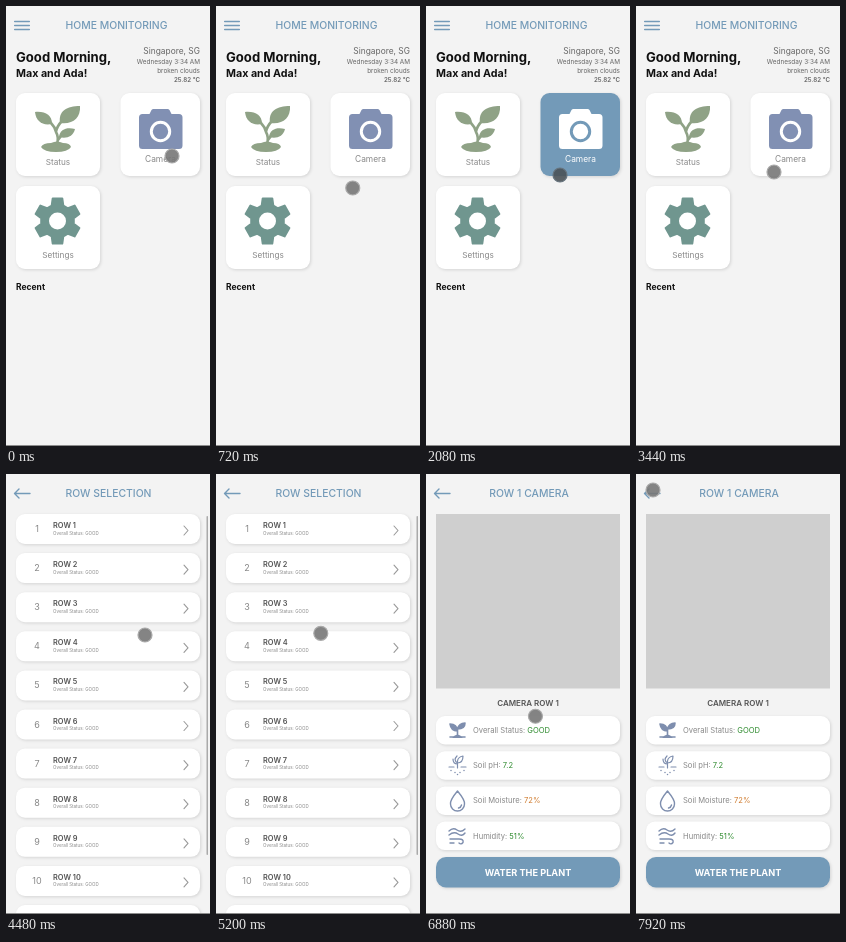
Animation, 204 px wide and 440 px high, one loop 8000 ms. Source, as an HTML page:

```html
<!DOCTYPE html>
<html lang="en">
<head>
<meta charset="utf-8">
<style>
html, body { margin: 0; width: 100%; height: 100%; overflow: hidden; background: #f3f3f3; }
svg { display: block; width: 204px; height: 440px; font-family: Inter, "Open Sans", sans-serif; }
.card { fill: #fff; filter: drop-shadow(1px 1.5px 1.5px #00000020); }
.line { fill: none; stroke-linecap: round; stroke-linejoin: round; }
#camera { --card: #fff; --icon: #8190b3; --label: #888; }
#camera.hot { --card: #739ab8; --icon: #fff; --label: #fff; }
#camera .card { fill: var(--card); }
</style>
</head>
<body>
<svg id="stage" viewBox="0 0 204 440"></svg>
<script>
const LOOP = 8000, BLUE = '#739ab8', SLATE = '#7e8eae', LEAF = '#8fa286', TEAL = '#70968f';

const text = (x, y, size, str, fill, weight = 400, anchor = 'start') =>
  `<text x="${x}" y="${y}" font-size="${size}" fill="${fill}" font-weight="${weight}" text-anchor="${anchor}">${str}</text>`;
const mid = (x, y, size, str, fill, weight) => text(x, y, size, str, fill, weight, 'middle');
const right = (y, size, str, weight) => text(194, y, size, str, '#666', weight, 'end');
const card = (x, y, w, h, r = 9) => `<rect class="card" x="${x}" y="${y}" width="${w}" height="${h}" rx="${r}"/>`;
const line = (d, stroke, width) => `<path class="line" d="${d}" stroke="${stroke}" stroke-width="${width}"/>`;
const list = (n, fn) => Array.from({ length: n }, (_, i) => fn(i)).join('');
const title = (x, str) => mid(x, 23.3, 10.4, str, BLUE, 500);
const back = line('M24 19.5H8.5M13 15L8.5 19.5L13 24', BLUE, 1.4);

const plant = `<g fill="${LEAF}">
  <path d="M54 117C52 105 61 100 74 100C75 112 66 119 54 117Z"/>
  <path d="M46 118C36 120 30 115 29 106C39 105 46 109 46 118Z"/>
  <path d="M53 131C54 123 61 121 69 123C67 131 60 133 53 131Z"/>
  <path d="M35 141Q37 137 45 137Q51 134 57 137Q64 137 65 141Q62 146 50 146Q38 146 35 141Z"/></g>` +
  line('M51 138Q53 131 50 126Q49 121 45 117M50 126Q51 120 56 115M52 134L55 130', LEAF, 2.6);

function gear(cx, cy) {
  const at = (r, a) => `${cx + r * Math.sin(a)},${cy - r * Math.cos(a)}`;
  const points = list(6, i => [[16.5, -.36], [23, -.21], [23, .21], [16.5, .36]]
    .map(([r, a]) => at(r, i * Math.PI / 3 + a)).join(' ') + ' ');
  return `<polygon points="${points}" fill="${TEAL}" stroke="${TEAL}" stroke-width="2" stroke-linejoin="round"/>
    <circle cx="${cx}" cy="${cy}" r="8.5" fill="#fff"/>`;
}

const home = title(110.5, 'HOME MONITORING') +
  line('M8.700 15.500H23.300M8.700 19.500H23.300M8.700 23.500H23.300', BLUE, 1.5) +
  text(10, 56, 13.1, 'Good Morning,', '#111', 700) +
  text(10, 71, 10.7, 'Max and Ada!', '#111', 700) +
  right(48, 8.4, 'Singapore, SG') + right(58, 6.4, 'Wednesday 3:34 AM') +
  right(67, 6.4, 'broken clouds') + right(75.5, 6.2, '25.82 °C', 600) +
  card(10, 87, 84, 83) + plant + mid(52, 159, 8.2, 'Status', '#888') +
  `<g id="camera">${card(114.5, 87, 79.5, 83)}
    <path fill="var(--icon)" d="M136.500 108H143.500L145.500 104Q146.200 103 147.500 103H161.500Q162.800 103 163.500 104L165.500 108H173Q176.500 108 176.500 111.500V139.500Q176.500 143 173 143H136.500Q133 143 133 139.500V111.500Q133 108 136.500 108Z"/>
    <circle cx="154.500" cy="125.500" r="9.200" fill="none" stroke="var(--card)" stroke-width="3"/>
    ${mid(154.5, 156, 8.4, 'Camera', 'var(--label)')}</g>` +
  card(10, 180, 84, 83) + gear(51.5, 215) + mid(52, 251.5, 8.2, 'Settings', '#888') +
  text(10, 284, 8.5, 'Recent', '#111', 700);

const rows = title(102.5, 'ROW SELECTION') + back +
  list(11, i => `<g transform="translate(0 ${i * 39.1})">` + card(10, 40, 184, 30) +
    mid(31, 58, 9, i + 1, '#888') + text(47, 54, 7.4, 'ROW ' + (i + 1), '#555', 600) +
    text(47, 60.5, 4.5, 'Overall Status: GOOD', '#888') +
    line('M178 52L182 56.500L178 61', '#999', 1.1) + '</g>') +
  '<rect x="200.500" y="42" width="1.500" height="339" rx=".7" fill="#aaa"/>';

const icons = [
  line('M24 263H39M31.5 262V254M31.5 257Q25 257 24 250Q31 250 31.500 257M31.500 255Q33 249 39 249Q39 255 31.500 255', SLATE, 1.6) +
    `<path d="M24 250Q31 250 31.500 257Q25 257 24 250M39 249Q33 249 31.500 255Q39 255 39 249M26 264Q31.500 257 37 264Z" fill="${SLATE}"/>`,
  line('M23 293H28M35 293H40M31.500 294V287M31.500 290Q27 290 27 285M31.500 287Q32 283 37 282Q37 289 31.500 289Q27 286 31 282', SLATE, 1.2) +
    line('M25 296.500h0M29 298.500h0M34 298.500h0M38 296.500h0M31.500 300.500h0', SLATE, 1.5),
  line('M31.500 317Q24 326 24.500 330A7 7 0 0 0 38.500 330Q39 326 31.500 317ZM35.500 331Q35 333.500 32.500 334', SLATE, 1.4),
  line('M23 357Q27 353 31 356T39 355M23 361Q28 357 32 360T39 359M24 365H33Q38 365 37 368.500Q35 371 33 369M24 369H28', SLATE, 1.4)
];
const readings = [
  ['Overall Status', 'GOOD', '#2e8b2e'], ['Soil pH', '7.2', '#2e8b2e'],
  ['Soil Moisture', '72%', '#cf7a2c'], ['Humidity', '51%', '#2e8b2e']
];
const detail = title(103, 'ROW 1 CAMERA') + back +
  '<rect x="10" y="40" width="184" height="174.500" fill="#cfcfcf"/>' +
  mid(102, 231.5, 8, 'CAMERA ROW 1', '#555', 600) +
  list(4, i => {
    const [name, value, color] = readings[i], y = 242 + i * 35.2;
    return card(10, y, 184, 28.5) + icons[i] +
      text(47, y + 17, 7.6, `${name}: <tspan fill="${color}">${value}</tspan>`, '#888');
  }) +
  `<rect class="card" style="fill:${BLUE}" x="10" y="383" width="184" height="30.500" rx="10"/>` +
  mid(102, 402, 9.2, 'WATER THE PLANT', '#fff', 700);

const stage = document.getElementById('stage');
stage.innerHTML = [home, rows, detail].map(p => `<g class="page">${p}</g>`).join('') +
  `<rect y="439" width="204" height="1" fill="#8c8c8c"/>
  <g id="cursor">
    <circle id="dot" r="7" fill="#777" fill-opacity=".9" stroke="#aaa" stroke-width="1.200"/>
    <path id="arrow" d="M0 0V9.500L2.300 7.500L4 11L5.700 10.200L4.200 6.900H7Z" fill="#fff" stroke="#333" stroke-width=".9"/>
  </g>`;

const pages = [...document.querySelectorAll('.page')];
const [camera, cursor, dot, arrow] = ['camera', 'cursor', 'dot', 'arrow'].map(id => document.getElementById(id));

// Cursor path: time, x, y
const path = [
  [0, 166, 150], [880, 134, 185], [1760, 134, 185], [2080, 134, 169], [2640, 138, 168],
  [3440, 138, 166], [4080, 139, 161], [4480, 139, 161], [4880, 156, 162], [5280, 99, 159],
  [5520, 69, 44], [6400, 69, 44], [7280, 140, 392], [7440, 140, 392], [7880, 17, 16], [LOOP, 17, 16]
];
function position(t) {
  const i = path.findIndex(k => k[0] > t);
  const [t0, x0, y0] = path[i - 1], [t1, x1, y1] = path[i];
  const u = (t - t0) / (t1 - t0), e = u * u * (3 - 2 * u);
  return [x0 + (x1 - x0) * e, y0 + (y1 - y0) * e];
}
const within = (t, a, b) => t >= a && t < b;

function draw(now) {
  const t = now % LOOP;
  const page = t < 3760 ? 0 : t < 6400 ? 1 : 2;
  pages.forEach((p, i) => p.style.display = i === page ? '' : 'none');
  const hot = within(t, 1960, 2480) || within(t, 3600, 3760);
  camera.classList.toggle('hot', hot);
  const pointing = within(t, 5680, 6400);
  dot.style.display = pointing ? 'none' : '';
  arrow.style.display = pointing ? '' : 'none';
  dot.setAttribute('fill', hot ? '#4a5258' : '#777');
  dot.setAttribute('stroke', hot ? '#67747e' : '#aaa');
  cursor.setAttribute('transform', `translate(${position(t)})`);
  requestAnimationFrame(draw);
}
requestAnimationFrame(draw);
</script>
</body>
</html>
```
